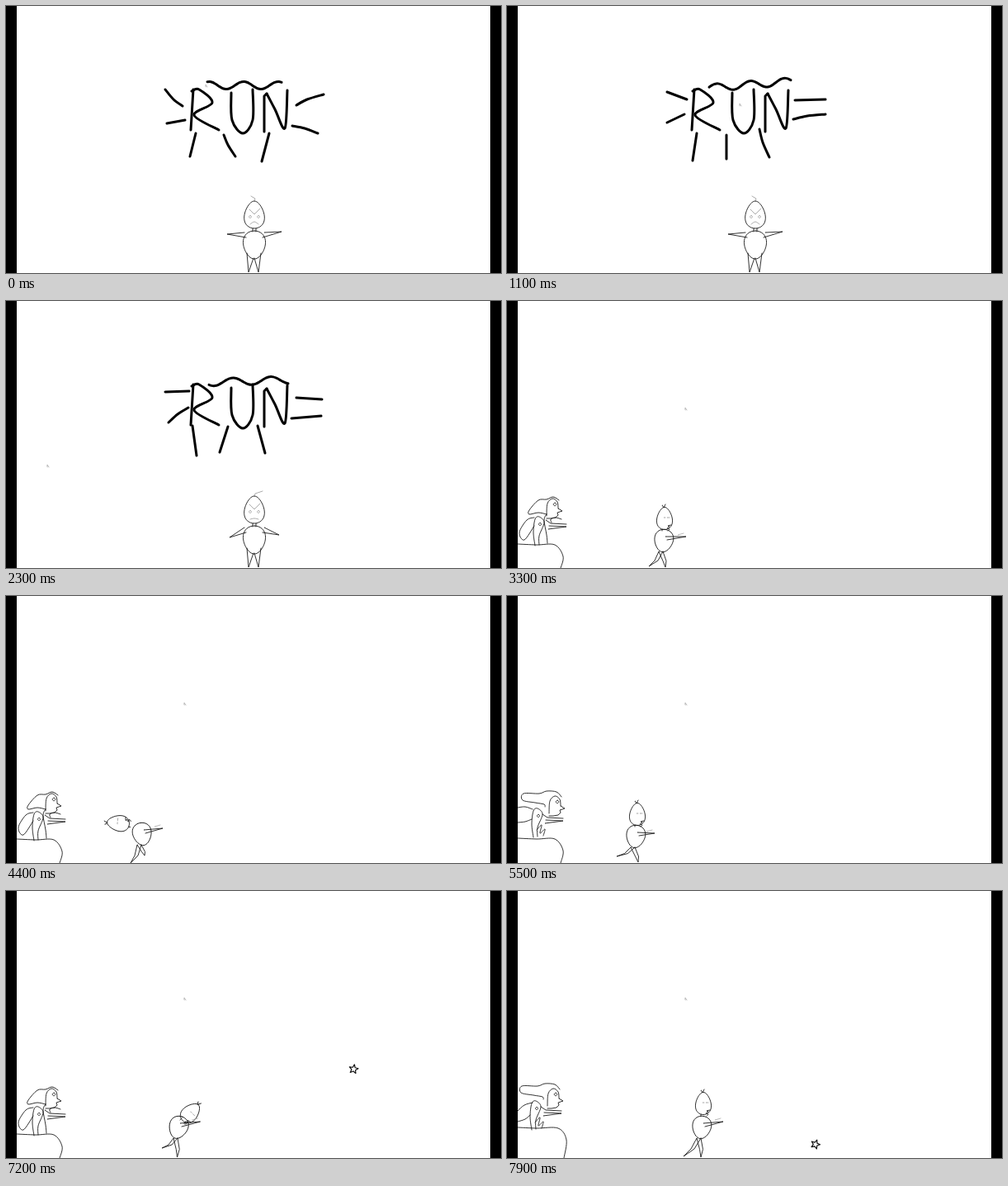
Write an HTML page with a canvas that moves like this. It is 600x323 px and loops after 8000 ms.

```html
<!DOCTYPE html>
<html lang="en">
<head>
<meta charset="utf-8">
<title>Run</title>
<style>
html, body { margin: 0; width: 100%; height: 100%; overflow: hidden; background: #fff; }
canvas { display: block; }
</style>
</head>
<body>
<canvas id="stage" width="600" height="323"></canvas>
<script>
const c = document.getElementById('stage').getContext('2d');
const LOOP = 8000, STEP = 100, CUT = 3300;
const INK = '#1c1c1c', PALE = '#999', TAU = Math.PI * 2;

function ink(width, color) {
  c.lineWidth = width;
  c.strokeStyle = color;
}
// Straight path through x, y pairs.
function line(...p) {
  c.beginPath();
  for (let i = 0; i < p.length; i += 2) c.lineTo(p[i], p[i + 1]);
  c.stroke();
}
// Smooth path through x, y pairs.
function curve(...p) {
  const last = p.length - 2;
  const at = i => Math.max(0, Math.min(last, i));
  c.beginPath();
  c.moveTo(p[0], p[1]);
  for (let i = 0; i < last; i += 2) {
    const a = at(i - 2), d = i + 2, e = at(i + 4);
    c.bezierCurveTo(p[i] + (p[d] - p[a]) / 6, p[i + 1] + (p[d + 1] - p[a + 1]) / 6,
      p[d] - (p[e] - p[i]) / 6, p[d + 1] - (p[e + 1] - p[i + 1]) / 6, p[d], p[d + 1]);
  }
  c.stroke();
}
// Oval that is wider at the top for a positive taper, at the bottom for a negative one.
function egg(x, y, w, h, taper) {
  c.beginPath();
  for (let a = 0; a < TAU; a += TAU / 40)
    c.lineTo(x + w * Math.sin(a) * (1 + taper * Math.cos(a)), y - h * Math.cos(a));
  c.closePath();
  c.stroke();
}
const ring = (x, y, r) => egg(x, y, r, r, 0);
// Thin triangle from a base of half-size dx, dy to its tip.
const spike = (x, y, dx, dy, tx, ty) => line(x - dx, y - dy, tx, ty, x + dx, y + dy);
function placed(x, y, angle, draw) {
  c.save();
  c.translate(x, y);
  c.rotate(angle);
  draw();
  c.restore();
}
// Linear interpolation through rows of [time, ...values].
function tween(keys, t) {
  let i = 0;
  while (i < keys.length - 2 && t >= keys[i + 1][0]) i++;
  const a = keys[i], b = keys[i + 1];
  const f = Math.max(0, Math.min(1, (t - a[0]) / (b[0] - a[0])));
  return a.slice(1).map((v, j) => v + (b[j + 1] - v) * f);
}

function letters() {
  line(227, 101, 224, 150);
  curve(225, 103, 234, 101, 250, 117, 228, 132, 258, 150);
  curve(273, 105, 274, 138, 287, 154, 299, 138, 299, 101);
  line(313, 152, 313, 109, 316, 106);
  curve(316, 106, 326, 125, 338, 148, 341, 102);
}
function wave(from, to, crest, period, level, slope) {
  const p = [];
  for (let x = from; x <= to; x += 3)
    p.push(x, level + slope * (x - 290) - 4.5 * Math.cos((x - crest) / period * TAU));
  curve(...p);
}
const BURSTS = [
  () => {
    curve(193, 101, 203, 113, 214, 121);
    line(195, 142, 217, 138);
    line(230, 154, 223, 182);
    curve(264, 156, 269, 168, 278, 182);
    line(319, 154, 310, 188);
    curve(352, 120, 365, 113, 385, 107);
    curve(347, 145, 362, 148, 378, 154);
    wave(244, 336, 288, 42, 96, 0);
  },
  () => {
    line(194, 104, 218, 113);
    line(194, 141, 215, 131);
    line(230, 154, 225, 187);
    line(266, 156, 266, 185);
    curve(306, 149, 310, 165, 318, 183);
    line(349, 114, 386, 113);
    curve(347, 137, 364, 133, 386, 131);
    wave(245, 344, 254, 41, 95.5, -0.08);
  },
  () => {
    line(193, 110, 222, 109);
    curve(197, 147, 208, 137, 221, 129);
    line(226, 151, 231, 187);
    line(269, 152, 259, 183);
    line(305, 151, 314, 184);
    line(352, 117, 383, 119);
    line(346, 142, 382, 139);
    wave(246, 344, 275, 46, 97, -0.03);
  }
];
const BURST_ORDER = [0, 1, 0, 2, 1];

function standing(low) {
  ink(0.9, INK);
  egg(301, 252.5, 12, 16.5, -0.25);
  egg(301, 289, 13.3, 17, 0.2);
  line(299, 269, 299, 273);
  line(303, 269, 303, 273);
  const reach = low ? 30 : 33, tip = low ? 284 : 274;
  spike(290, 277, 1, 3, 301 - reach, tip + 2);
  spike(312, 277, -1, 3, 301 + reach, tip - 1);
  spike(296, 302, 4, 3, 294, 322);
  spike(305, 302, 4, -3, 306, 322);
  ink(0.8, PALE);
  line(301, 236, 302, 233, low ? 311 : 297, 230);
  line(295, 246, 301, 252, 308, 245);
  ring(296, 255, 1.4);
  ring(306, 255, 1.4);
  curve(296, 264, 301, low ? 263 : 261, 306, 264);
}

// time, body, head, head turn in degrees, arm tip, both feet
const RUNNER = [
  [3400, 190, 290, 191, 264, 0, 217, 285, 172, 321, 192, 322],
  [4400, 165, 288, 137, 275, -84, 190, 281, 151, 323, 168, 314],
  [5500, 156, 291, 158, 265, 0, 179, 287, 133, 315, 159, 322],
  [6500, 182, 286, 208, 280, 90, 209, 279, 164, 301, 180, 322],
  [7900, 236, 286, 238, 258, 0, 262, 279, 214, 321, 235, 322]
];
function leg(x, y, fx, fy) {
  const kx = (x + fx) / 2 + 2, ky = (y + fy) / 2 + 2;
  line(x - 2, y, kx - 2, ky, fx, fy, kx + 2, ky, x + 3, y);
}
function runner(t) {
  const [bx, by, hx, hy, deg, ax, ay, lx, ly, rx, ry] = tween(RUNNER, t);
  const turn = deg / 360 * TAU;
  leg(bx - 4, by + 13, lx, ly);
  leg(bx - 4, by + 13, rx, ry);
  placed(bx, by, 0.14 + turn / 5, () => egg(0, 0, 11.2, 13.7, 0.2));
  spike(bx + 3, by - 3, 1, 2, ax, ay);
  placed(hx, hy, turn, () => {
    egg(0, -1, 9.3, 13.5, -0.25);
    line(-3, -17, -1, -14, 1, -18);
    curve(8, 7, 4, 8, 6, 9, 3, 11, 6, 12, 4, 14);
    line(-3, 12, -3, 14);
    ink(0.8, PALE);
    line(3, -2, 6, -2);
    line(-1, -2, 1, -2);
  });
  ink(0.8, '#aaa');
  line(ax - 10, ay - 2, ax - 3, ay - 4);
}

const hill = (x, y) => curve(13, y, 36, y + 1, x - 10, y + 1, x, y + 15, x - 3, 323);
function profile() {
  curve(48, 260, 49, 245, 55, 239, 61, 243, 62, 251);
  line(62, 251, 67, 254, 61, 256, 62, 259, 59, 262, 53, 263, 48, 263);
  ring(58, 246, 1.7);
}
function child() {
  curve(34, 296, 32, 280, 34, 264, 39, 261, 45, 268, 39, 284, 39, 295);
  ring(40, 270, 1.5);
}
function arms() {
  line(47, 265, 53, 269, 72, 270);
  line(50, 276, 72, 273, 51, 272);
}
function crowdLeaning() {
  hill(68, 294);
  curve(48, 258, 38, 256, 27, 258, 27, 253, 38, 241, 48, 240, 56, 237, 63, 241);
  profile();
  child();
  arms();
  curve(33, 262, 24, 265, 15, 280, 21, 289, 33, 272);
  curve(48, 258, 45, 265, 48, 283, 49, 293);
  curve(54, 268, 53, 264, 59, 262, 66, 264);
}
function crowdUpright() {
  curve(46, 255, 45, 252, 34, 250, 19, 247, 20, 239, 39, 239, 48, 236, 60, 237, 66, 243);
  placed(3, 3, 0, profile);
  placed(-2, -4, 0, child);
  placed(-4, -1, 0, arms);
  curve(36, 283, 42, 277, 40, 287, 46, 282, 44, 290);
}
function crowd(step) {
  const k = step % 10;
  if (k < 5) return crowdLeaning();
  if (k < 8) {
    crowdUpright();
    curve(13, 256, 22, 255, 31, 258);
    curve(13, 274, 22, 273, 30, 270);
    hill(68, 293);
  } else {
    placed(-2, -3, 0, crowdUpright);
    curve(13, 266, 21, 259, 31, 256);
    curve(13, 279, 22, 276, 28, 271);
    hill(72, 286);
  }
}

function star(t) {
  if (t < 5700) return;
  const s = t - 6500;
  placed(469 - s * 0.068, 124.5 + s * 0.13, s * 0.00025, () => {
    c.beginPath();
    for (let i = 0; i < 10; i++) {
      const r = i % 2 ? 2.5 : 5.7, a = i / 10 * TAU;
      c.lineTo(r * Math.sin(a), -r * Math.cos(a));
    }
    c.closePath();
    ink(1.2, '#111');
    c.stroke();
  });
}

const CURSOR = [
  [0, 242, 95], [1100, 282, 118], [1300, 270, 84],
  [1800, 50, 198], [2700, 50, 198], [3200, 216, 129]
];
function cursor(t) {
  const [x, y] = tween(CURSOR, t);
  ink(0.8, '#aaa');
  line(x, y + 3, x, y, x + 2, y + 3);
}

function draw(t) {
  const step = Math.floor(t / STEP);
  c.fillStyle = '#fff';
  c.fillRect(0, 0, 600, 323);
  c.lineCap = c.lineJoin = 'round';
  if (t < CUT) {
    ink(3, '#000');
    letters();
    BURSTS[BURST_ORDER[step % 5]]();
    standing(Math.floor(step / 4) % 2);
  } else {
    ink(0.9, INK);
    crowd(step);
    runner(t);
    star(t);
  }
  cursor(t);
  c.fillStyle = '#000';
  c.fillRect(0, 0, 13, 323);
  c.fillRect(587, 0, 13, 323);
}

const start = performance.now();
function frame() {
  const t = (performance.now() - start) % LOOP;
  draw(Math.floor(t / STEP) * STEP);
  requestAnimationFrame(frame);
}
frame();
</script>
</body>
</html>
```
